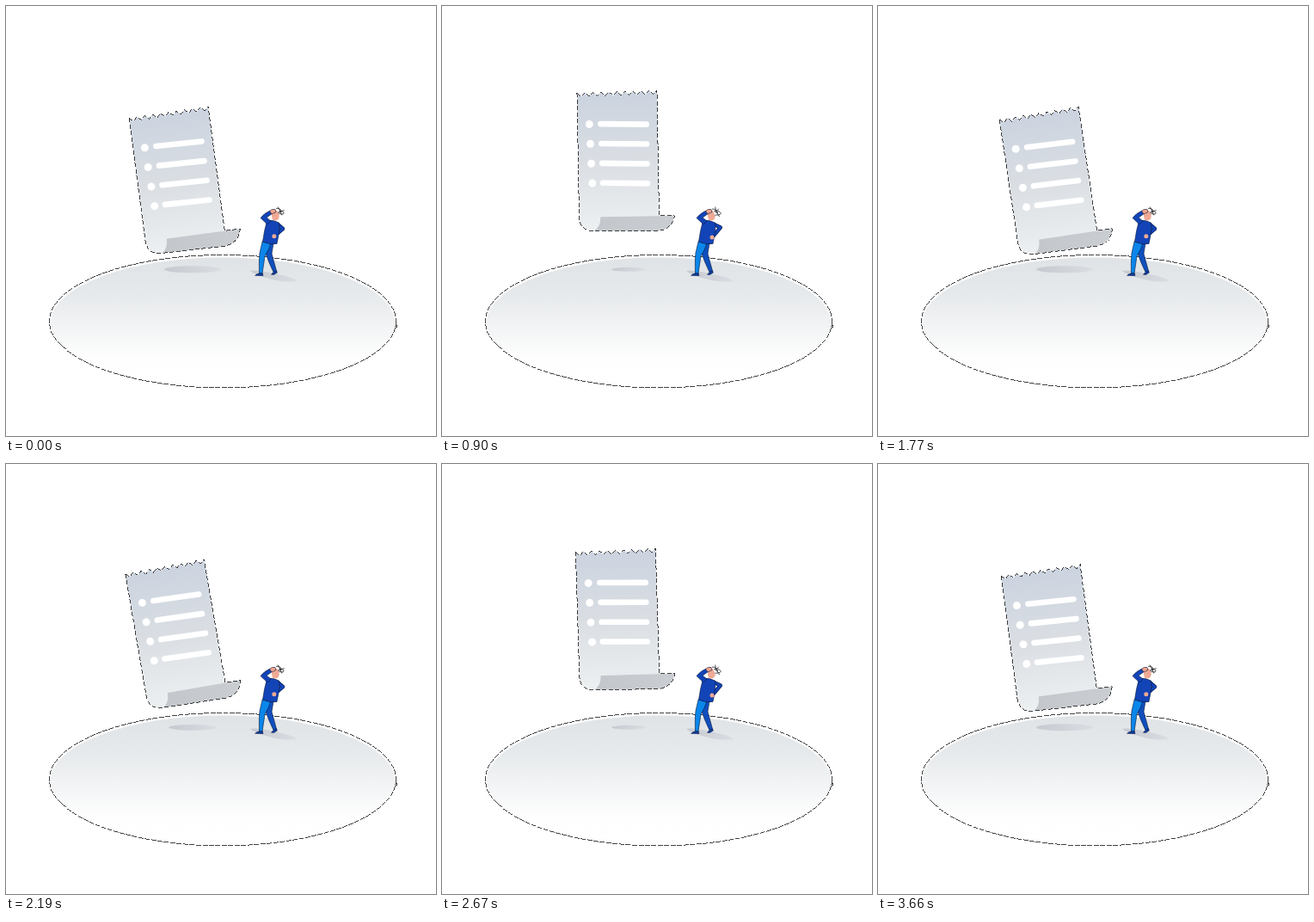
An HTML page for the animation above (3690 ms loop, 500 by 500 pixels).

```html
<!DOCTYPE html>
<html lang="en">
<head>
<meta charset="utf-8">
<title>Floating receipt</title>
<style>
html, body { margin: 0; width: 100%; height: 100%; overflow: hidden; background: #fff; }
svg { display: block; width: 100vw; height: 100vh; }
.edge { fill: none; stroke: #111; stroke-width: .8; shape-rendering: crispEdges; }
.ink { stroke: #0a1738; stroke-width: .6; stroke-linejoin: round; }
</style>
</head>
<body>
<svg viewBox="0 0 500 500">
  <defs>
    <linearGradient id="floor" x1="0" y1="0" x2="0" y2="1">
      <stop offset="0" stop-color="#dfe3e6"/>
      <stop offset=".3" stop-color="#e7eaec"/>
      <stop offset=".78" stop-color="#fefefe"/>
      <stop offset="1" stop-color="#fff"/>
    </linearGradient>
    <linearGradient id="paper" x1="0" y1="0" x2="0" y2="1">
      <stop offset="0" stop-color="#cbd3df"/>
      <stop offset=".5" stop-color="#dadee3"/>
      <stop offset="1" stop-color="#edf0f1"/>
    </linearGradient>
    <linearGradient id="back">
      <stop offset="0" stop-color="#c3c7cc"/>
      <stop offset="1" stop-color="#cacdd2"/>
    </linearGradient>
    <linearGradient id="shade">
      <stop offset="0" stop-color="#c6cad0"/>
      <stop offset="1" stop-color="#dadde2"/>
    </linearGradient>
  </defs>

  <ellipse cx="252" cy="366.7" rx="201.3" ry="77.2" fill="#fff"/>
  <ellipse cx="252" cy="368" rx="199.8" ry="75.4" fill="url(#floor)"/>
  <ellipse class="edge" cx="252" cy="366.7" rx="201.5" ry="77.2" stroke-dasharray="6 1.5"/>
  <path class="edge" d="M453 371h1.5v2h-1.5"/>

  <ellipse id="shadow" cx="217" cy="306.3" fill="url(#shade)"/>
  <path d="M284 308Q291 306 312 311Q336 316 339 320Q322 322 306 317Q288 312 284 308Z" fill="url(#shade)"/>

  <g id="receipt">
    <path id="sheet" fill="url(#paper)"/>
    <path d="M184 244H270.2Q267 260.5 249.5 261.6L176 260.2Q184 256 184 244Z" fill="url(#back)"/>
    <path id="rim" class="edge" stroke-dasharray="5 2.5"/>
    <g id="rows" fill="#fff" stroke="#fff" stroke-width="6.6" stroke-linecap="round"></g>
  </g>

  <g>
    <path class="ink" fill="#104fbd" d="M302 275L311 276L309 288L314.5 308L311 309.5Q305 297 302 288Z"/>
    <path class="ink" fill="#0b86ea" d="M298 274L308 276Q305 285 301 291L298 311L294.5 311Q294 295 295 287Z"/>
    <path fill="#123a95" stroke="#0a1738" stroke-width=".4" d="M289.5 313.4Q291 311.5 294.5 310.8L298.5 310.8L299 313.7ZM308.5 312.4Q309.5 310.5 311.5 309L314.5 307.5L315.5 310L311.5 312.5Z"/>
    <path id="arm" fill="none" stroke="#0a1738" stroke-width="4.4" stroke-linejoin="round"/>
    <path id="sleeve" fill="none" stroke="#1244b8" stroke-width="3.5" stroke-linejoin="round"/>
    <path class="ink" fill="#1244b8" d="M303.5 249.5Q310 248 317.5 252Q319 258 315 276.5Q306 278 298.5 274Q300 262 303.5 249.5Z"/>
    <path class="ink" fill="#1244b8" d="M304 254L296 246.5Q300 241 307 238L309.5 241.5L303 246L308 250Z"/>
    <path fill="#efa994" d="M309.5 239Q314 236 317 240Q319 245 316 248.5Q313.5 250 310.5 249Q308 244 309.5 239Z"/>
    <path class="ink" fill="#f0a58f" d="M306.5 238.5Q309 235.5 313 236.5L314 239.5L309 242Z"/>
    <circle id="hand" r="2.5" fill="#efa994"/>
    <path id="hair" fill="#fff" stroke="#26262b" stroke-width=".8"/>
  </g>
</svg>
<script>
const LOOP = 3690, STEP = 30, BOB = 1800, LIFT = 17.4;
const swing = [[0, 7.6], [900, 1], [2100, 10.1], [2850, .4], [LOOP, 7.6]];
const $ = id => document.getElementById(id);
const set = (id, attrs) => { for (const k in attrs) $(id).setAttribute(k, attrs[k]); };
const mix = (a, b, k) => a + (b - a) * k;
const ease = x => (1 - Math.cos(Math.PI * Math.min(1, Math.max(0, x)))) / 2;

function buildReceipt() {
  const left = 159.2, right = 252.2, teeth = 10, w = (right - left) / teeth;
  let top = `M${left} 99.5`;
  for (let i = 0; i < teeth; i++) {
    const x = left + i * w, y = 99.5 - i * .12;
    top += `L${x + w / 2} ${y + 4.2}L${x + w} ${y - .4}`;
  }
  const roll = `Q165.5 260 161.3 253Q159.7 249 ${left} 244Z`;
  set("sheet", { d: `${top}V244H184Q184 256 176 260.2${roll}` });
  set("rim", { d: `${top}V244H270.2Q267 260.5 249.5 261.6L176 260.2${roll}` });
  let rows = "";
  for (let i = 0; i < 4; i++) {
    const y = 136 + 22.9 * i;
    rows += `<circle cx="${172.9 + .75 * i}" cy="${y}" r="4.5" stroke="none"/>` +
      `<path d="M${186 + .5 * i} ${y - .1}L239.3 ${y + 1.4}"/>`;
  }
  $("rows").innerHTML = rows;
}

function angleAt(t) {
  const i = swing.findIndex((key, n) => n && t <= key[0]);
  const [t0, a] = swing[i - 1], [t1, b] = swing[i];
  return mix(a, b, ease((t - t0) / (t1 - t0)));
}

function draw(t) {
  const low = (1 + Math.cos(2 * Math.PI * t / BOB)) / 2;
  const angle = angleAt(t);
  set("receipt", { transform: `translate(0 ${LIFT * low}) rotate(${-angle} 253 228)` });
  set("shadow", { rx: mix(19.6, 33.2, low), ry: mix(2.5, 4, low) });

  // the figure's free arm and hair follow the swing
  const k = ease((angle - 1.8) / 3);
  const hx = mix(314, 311.8, k), hy = mix(269, 267.8, k);
  const limb = `M315.5 253.5L${mix(323.8, 322, k)} ${mix(257.5, 259, k)}L${hx + 1} ${hy - 1}`;
  set("arm", { d: limb });
  set("sleeve", { d: limb });
  set("hand", { cx: hx, cy: hy });
  const s = mix(1.2, -.6, k);
  set("hair", { d: `M314 ${235.5 + s / 2}Q318 235 320 ${238 + s}T316.5 ${239.5 - s}Q321 237 ${323 + s / 2} 240T317.5 ${242 + s}` +
    `M${316.5 + s} 233.5Q318 236 319 239L${323 - s} ${237 - s}M318 237L${321.5 + s} ${244 + s}` });
}

buildReceipt();
const begin = performance.now();
function tick() {
  const t = (performance.now() - begin) % LOOP;
  draw(Math.floor(t / STEP) * STEP);
  requestAnimationFrame(tick);
}
tick();
</script>
</body>
</html>
```
